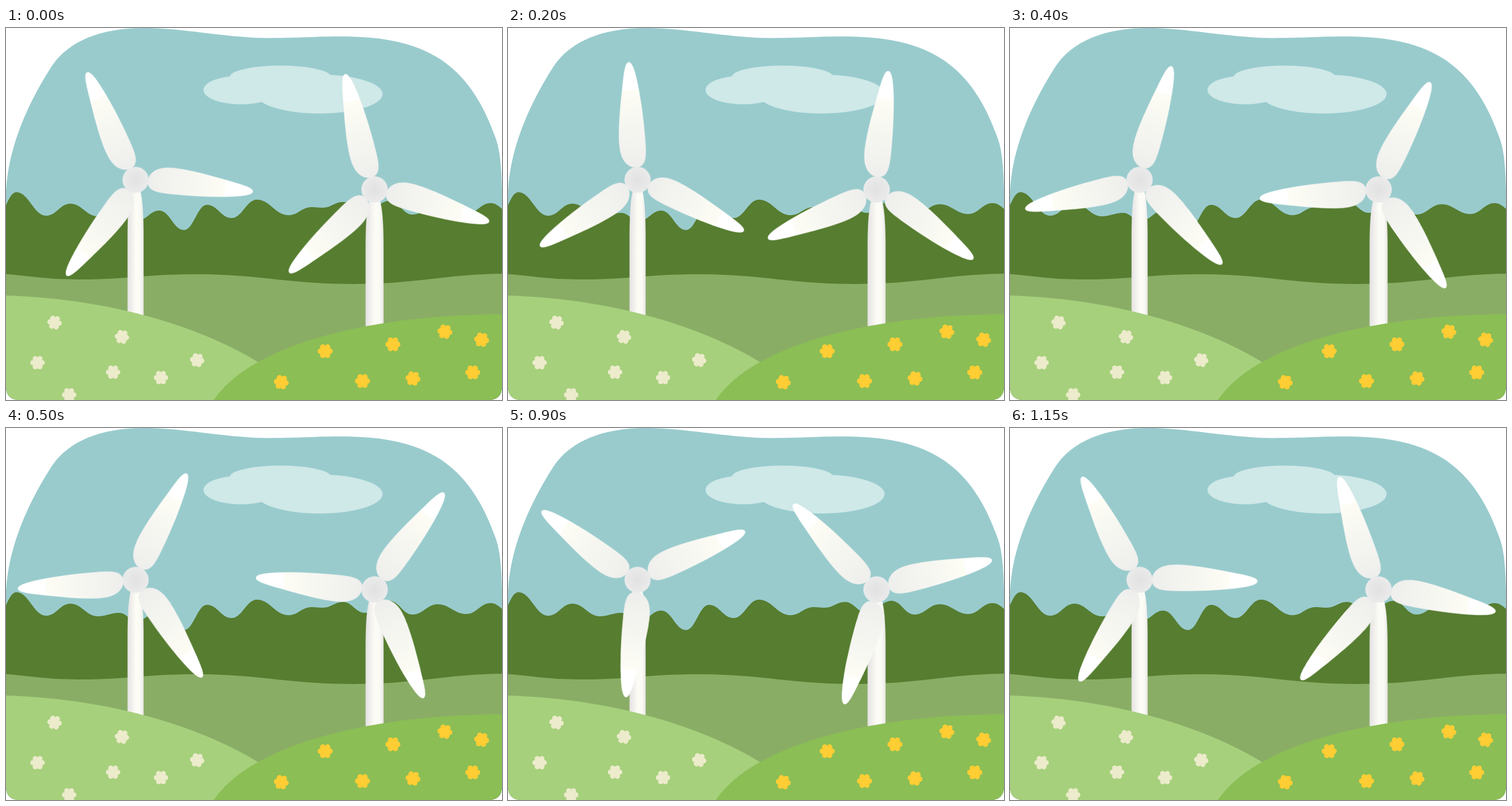
Animation of 864 by 648 pixels, one loop 1.2 s. Source, as an HTML page:

```html
<!DOCTYPE html>
<html lang="en">
<head>
<meta charset="utf-8">
<title>Wind turbines</title>
<style>
html, body { margin: 0; width: 100%; height: 100%; overflow: hidden; background: #fff; }
svg { display: block; width: 100vw; height: 100vh; }
.rotor { transform-origin: 0 0; }
</style>
</head>
<body>
<svg viewBox="0 0 864 648">
  <defs>
    <clipPath id="frame">
      <path d="M0 285C4 205 40 128 80 66C110 22 166 0 240 0C310 0 390 18 460 17.5S545 14 600 15C745 18 811 74 853 192C862 217 863 250 864 285V624Q864 648 840 648H24Q0 648 0 624Z"/>
    </clipPath>
    <linearGradient id="bladeFill" gradientUnits="userSpaceOnUse" x1="21" y1="0" x2="205" y2="0">
      <stop offset="0" stop-color="#eeeeec"/>
      <stop offset=".4" stop-color="#f6f6f1"/>
      <stop offset=".735" stop-color="#fdfdf5"/>
      <stop offset=".74" stop-color="#fff"/>
    </linearGradient>
    <linearGradient id="towerFill">
      <stop offset="0" stop-color="#e4e2e3"/>
      <stop offset=".52" stop-color="#fdfdf6"/>
      <stop offset=".78" stop-color="#fbfbf6"/>
      <stop offset="1" stop-color="#e9e7e7"/>
    </linearGradient>
    <radialGradient id="hubFill">
      <stop offset="0" stop-color="#e2e2e2"/>
      <stop offset="1" stop-color="#ebebeb"/>
    </radialGradient>
    <path id="blade" fill="url(#bladeFill)" d="M21 1C22-14 34-26.5 62-26.5C92-26.5 135-18 168-11.5C188-7.5 205-4 205.5 2C206 8 192 11.5 174 14C145 18 105 20 66 19.5C40 19 23 18 21 1Z"/>
    <g id="flower"><circle r="6"/></g>
  </defs>
  <g clip-path="url(#frame)">
    <rect width="864" height="648" fill="#99cbcd"/>
    <g fill="#cfe8e8">
      <ellipse cx="409.5" cy="108" rx="65.5" ry="25"/>
      <ellipse cx="546" cy="115" rx="110" ry="34"/>
      <ellipse cx="478" cy="85" rx="88" ry="19.5"/>
    </g>
    <path id="forest" fill="#567d30"/>
    <path id="field" fill="#8aad66"/>
    <g id="turbines"></g>
    <path fill="#a6d07c" d="M0 466C170 471 330 515 441 583L500 648H0Z"/>
    <path fill="#8bbe55" d="M362 648C425 555 620 500 864 498.500V648Z"/>
    <g id="paleFlowers" fill="#ecebcb"></g>
    <g id="goldFlowers" fill="#ffcd34"></g>
  </g>
</svg>
<script>
const LOOP = 1200, STEPS = 24, PETALS = 6;
const $ = id => document.getElementById(id);

function add(parent, tag, attrs) {
  const el = document.createElementNS('http://www.w3.org/2000/svg', tag);
  for (const k in attrs) el.setAttribute(k, attrs[k]);
  return parent.appendChild(el);
}

// Rolling line through its crests and dips, level at each of them
function ridge(id, points) {
  let [[px, py]] = points, d = `M${px} ${py}`;
  for (const [x, y] of points.slice(1)) {
    const pull = (x - px) * 0.42;
    d += `C${px + pull} ${py} ${x - pull} ${y} ${x} ${y}`;
    [px, py] = [x, y];
  }
  $(id).setAttribute('d', `${d}V648H${points[0][0]}Z`);
}

ridge('forest', [[-20, 336], [18, 286], [70, 327], [112, 306], [160, 328], [197, 322],
  [228, 336], [267, 318], [310, 352], [350, 308], [393, 331], [437, 299], [492, 326],
  [532, 312], [552, 313], [587, 303], [625, 322], [668, 301], [708, 325], [752, 307],
  [802, 324], [844, 305], [884, 325]]);
ridge('field', [[-50, 427], [125, 438], [330, 429], [605, 446], [880, 428]]);

for (let i = 0; i < PETALS; i++) {
  const a = i * 2 * Math.PI / PETALS;
  add($('flower'), 'circle', { cx: 8 * Math.cos(a), cy: 8 * Math.sin(a), r: 4.6 });
}

function plant(id, scale, spots) {
  spots.forEach(([x, y], i) => add($(id), 'use', {
    href: '#flower',
    transform: `translate(${x} ${y}) rotate(${i % 2 * 8}) scale(${scale})`
  }));
}

plant('paleFlowers', 1, [[186.5, 599.5], [202, 538], [270, 609], [333, 578.5],
  [110, 639], [84.5, 513], [55, 583]]);
plant('goldFlowers', 1.04, [[621, 615], [479.5, 617], [556, 563], [709, 610.5],
  [674, 551], [828.5, 543], [813, 600], [764.5, 529]]);

function turbine(x, y, scale, width, angle) {
  const g = add($('turbines'), 'g', { transform: `translate(${x} ${y}) scale(${scale})` });
  const w = width / 2, top = w * 0.55;
  add(g, 'path', {
    d: `M${-top} 17H${top}C${w - 2} 31 ${w} 58 ${w} 100V250H${-w}V100C${-w} 58 ${2 - w} 31 ${-top} 17Z`,
    fill: 'url(#towerFill)'
  });
  const rotor = add(g, 'g', { class: 'rotor' });
  for (const turn of [0, 120, 240])
    add(rotor, 'use', { href: '#blade', transform: `rotate(${turn})` });
  add(g, 'circle', { r: 22.8, fill: 'url(#hubFill)' });
  // Three equal blades, so a third of a turn closes the loop
  rotor.animate(
    [{ transform: `rotate(${angle}deg)` }, { transform: `rotate(${angle + 120}deg)` }],
    { duration: LOOP, iterations: Infinity, easing: `steps(${STEPS}, end)` });
}

turbine(225.7, 264.5, 1, 28, 5);
turbine(642, 281.3, 1.01, 31, 15);
</script>
</body>
</html>
```
